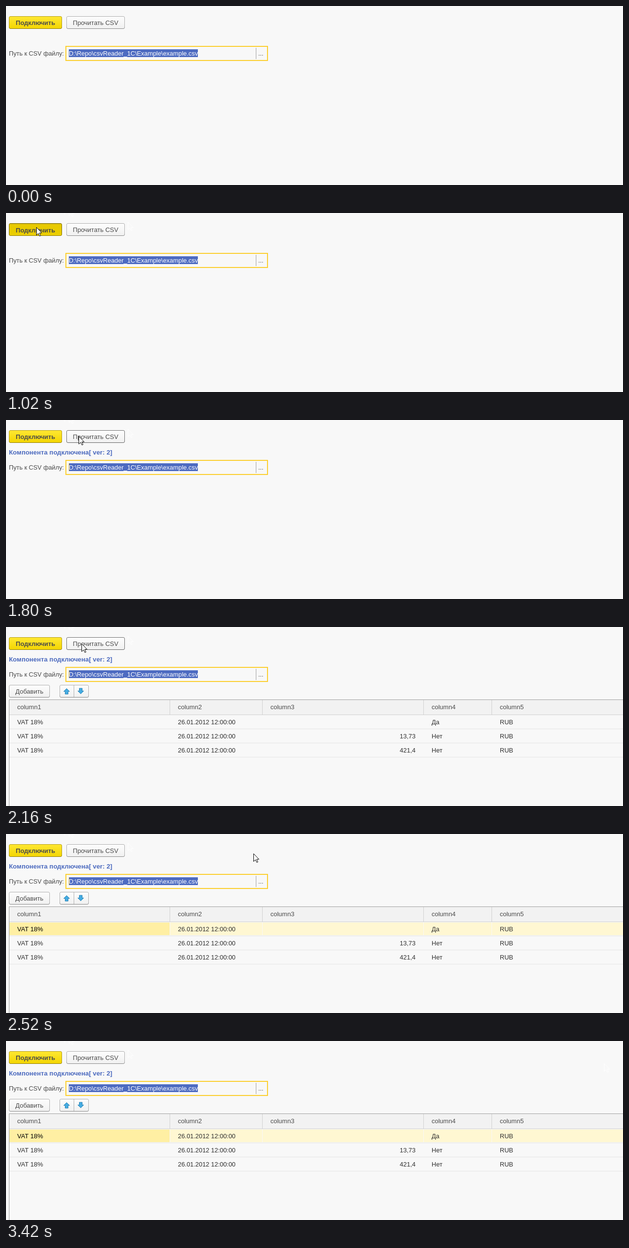
These frames come from a looping animation (1267x368 px, 3.6 s). An HTML page with a canvas:

```html
<!DOCTYPE html>
<html lang="ru">
<head>
<meta charset="utf-8">
<style>
  html, body { margin: 0; width: 100%; height: 100%; overflow: hidden; background: #f8f8f8; }
  canvas { display: block; }
</style>
</head>
<body>
<canvas id="stage" width="1267" height="368"></canvas>
<script>
const g = document.getElementById('stage').getContext('2d');
const LOOP = 3600, STEP = 60, BG = '#f8f8f8', INK = '#4a4a4a', DARK = '#303030';

// Key points of the pointer: time, x, y
const keys = [
  [300, 1028, 50], [420, 664, 50], [540, 250, 18], [600, 129, -11], [660, 113, -16],
  [780, 62, 29], [1440, 62, 29], [1800, 149, 33], [2160, 155, 34], [2220, 157, 34],
  [2820, 1035, 46], [3000, 1228, 46]
];
const HIDE = 3060;

const arrow = new Path2D('M.5 .5V16.5L4.2 13L7 18.5L9.2 17.5L6.7 12H11.5Z');
const upArrow = new Path2D('M0 -6L6 0H3V5.5H-3V0H-6Z');

// Smooth curve through the keys without overshoot
function slope(i, axis) {
  const d = j => (keys[j + 1][axis] - keys[j][axis]) / (keys[j + 1][0] - keys[j][0]);
  if (i === 0 || i === keys.length - 1) return 0;
  const a = d(i - 1), b = d(i);
  return a * b > 0 ? 2 * a * b / (a + b) : 0;
}

function tipAt(t) {
  if (t < keys[0][0] || t >= HIDE) return null;
  const next = keys.findIndex(k => k[0] > t);
  if (next < 0) return keys.at(-1).slice(1);
  const i = next - 1, span = keys[next][0] - keys[i][0], k = (t - keys[i][0]) / span;
  return [1, 2].map(axis => {
    const p = keys[i][axis], q = keys[next][axis];
    return p + (q - p) * k * k * (3 - 2 * k)
      + span * k * (1 - k) * (slope(i, axis) * (1 - k) - slope(next, axis) * k);
  });
}

// Moments at which the pointer leaves a pale mark behind
const marks = [540, 600, 660, 3000].map(t => ({ start: t + STEP, tip: tipAt(t) }));

function rect(x, y, w, h, color) {
  g.fillStyle = color;
  g.fillRect(x, y, w, h);
}

function text(s, x, y, color = INK, font = '13px', align = 'left') {
  g.font = font + ' "Liberation Sans", Arial, sans-serif';
  g.fillStyle = color;
  g.textAlign = align;
  g.fillText(s, x, y);
}

function fade(y, h, from, top, bottom) {
  const fill = g.createLinearGradient(0, y, 0, y + h);
  fill.addColorStop(from, top);
  fill.addColorStop(1, bottom);
  return fill;
}

function button(x, y, w, h, top, bottom, border, edge) {
  g.beginPath();
  g.roundRect(x + .5, y + .5, w - 1, h - 1, 2.5);
  g.fillStyle = fade(y, h, 0, top, bottom);
  g.fill();
  g.lineWidth = 1;
  g.strokeStyle = fade(y, h, 0.8, border, edge);
  g.stroke();
}

function plainButton(x, y, w, hover, pressed) {
  button(x, y, w, 26, pressed ? '#e4e4e4' : '#fdfdfd', pressed ? '#e4e4e4' : '#f0f0f0',
    hover ? '#707070' : '#b0b0b0', hover ? '#606060' : '#848484');
}

function shape(path, x, y, fill, line, dir = 1) {
  g.save();
  g.translate(x, y);
  g.scale(1, dir);
  g.fillStyle = fill;
  g.fill(path);
  g.lineWidth = 1;
  g.strokeStyle = line;
  g.stroke(path);
  g.restore();
}

function pointer([x, y], fill, line) {
  shape(arrow, Math.round(x), Math.round(y), fill, line);
}

function table(selected) {
  plainButton(6, 119, 84);
  text('Добавить', 48, 137, INK, '13px', 'center');
  plainButton(110, 119, 60);
  rect(139, 120, 1, 24, '#b0b0b0');
  shape(upArrow, 124.5, 132.5, '#45ace2', '#2a83b5');
  shape(upArrow, 153.5, 131.5, '#45ace2', '#2a83b5', -1);

  const edges = [6, 336, 526, 857, 997, 1267];
  const cols = edges.slice(0, 5).map(x => x + 17);
  rect(6, 149, 1261, 219, '#a0a0a0');
  rect(7, 150, 1260, 218, BG);
  rect(7, 150, 1260, 30, '#f2f2f2');
  rect(7, 180, 1260, 1, '#d0d0d0');
  cols.forEach((x, i) => {
    if (i) rect(edges[i], 150, 1, 30, '#d0d0d0');
    if (selected) rect(edges[i] + 1, 182, edges[i + 1] - edges[i] - 1, 26, i ? '#fff7d2' : '#ffefa3');
    text('column' + (i + 1), x, 169);
  });

  [['', 'Да'], ['13,73', 'Нет'], ['421,4', 'Нет']].forEach(([sum, flag], i) => {
    const y = 200 + i * 29;
    text('VAT 18%', cols[0], y, selected && !i ? '#000' : DARK);
    text('26.01.2012 12:00:00', cols[1], y, DARK, '12.9px');
    text(sum, 841, y, DARK, '13px', 'right');
    text(flag, cols[3], y, DARK);
    text('RUB', cols[4], y, DARK);
    rect(7, y + 9, 1260, 1, '#e4e4e4');
  });
}

function draw(t) {
  const tip = tipAt(t);
  const over = (x, w) => tip && tip[0] >= x && tip[0] < x + w && tip[1] >= 21 && tip[1] < 47;
  rect(0, 0, 1267, 368, BG);

  const down = t >= 1020 && t < 1200, hot = over(6, 109);
  if (down) {
    button(6, 21, 109, 26, '#e6c800', '#eccf00', '#7d6c00', '#8f7b00');
    rect(8, 22, 105, 1, '#c9ae00');
  } else {
    button(6, 21, 109, 26, '#ffe834', '#f3d500', hot ? '#8f7b00' : '#b59d10', hot ? '#6f6000' : '#8a7600');
  }
  text('Подключить', 60.5, down ? 40 : 39, INK, 'bold 13px', 'center');

  const reading = t >= 1980 && t < 2100;
  plainButton(124, 21, 120, over(124, 120), reading);
  text('Прочитать CSV', 184, reading ? 40 : 39, INK, '13px', 'center');

  if (t >= 1200) text('Компонента подключена[ ver: 2]', 6, 71, '#4d6bbf', 'bold 13.3px');

  text('Путь к CSV файлу:', 6, 102, INK, '12.8px');
  g.lineWidth = 2;
  g.strokeStyle = '#fccf2f';
  g.strokeRect(123, 83, 414, 29);
  rect(129, 89, 265, 16, '#4d6bc1');
  text('D:\\Repo\\csvReader_1C\\Example\\example.csv', 129, 102, '#fff', '12.9px');
  const caret = t >= 1200 && (t < 1620 || t % 360 < 180);
  if (caret) rect(129, 89, 1, 16, '#b2943e');
  rect(513, 86, 1, 23, '#a0a0a0');
  text('...', 518, 102, INK, '12.8px');

  if (t >= 2100) table(t >= 2220);
  marks.forEach(m => t >= m.start && pointer(m.tip, BG, '#fff'));
  if (tip) pointer(tip, '#fff', '#000');
}

const began = performance.now();
function tick() {
  const t = (performance.now() - began) % LOOP;
  draw(Math.floor(t / STEP) * STEP);
  requestAnimationFrame(tick);
}
tick();
</script>
</body>
</html>
```
